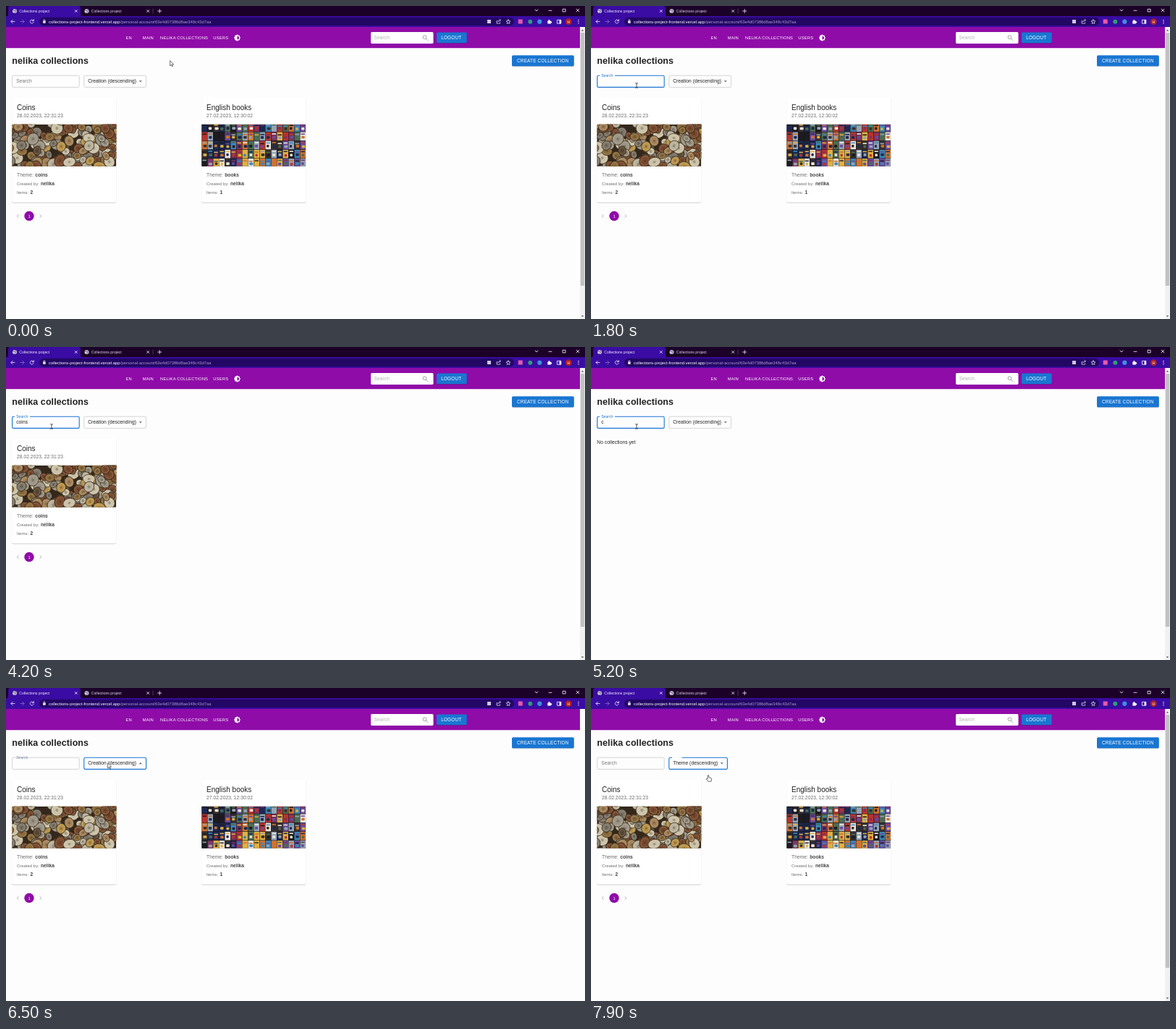
An HTML page that plays this animation: 800 px wide and 433 px high, repeating every 8000 ms.

```html
<!DOCTYPE html>
<html lang="en">
<head>
<meta charset="utf-8">
<title>Collections project</title>
<style>
  html, body { margin: 0; width: 100%; height: 100%; overflow: hidden; background: #fff; }
  svg { display: block; width: 800px; height: 433px; }
  text { font-family: "Liberation Sans", Arial, sans-serif; white-space: pre; }
  .line { fill: none; stroke-width: .8; stroke-linecap: round; stroke-linejoin: round; }
</style>
</head>
<body>
<svg id="stage" viewBox="0 0 800 433" xmlns="http://www.w3.org/2000/svg"></svg>
<script>
const LOOP = 8000;
const INK = '#212121', GREY = '#6b6b6b', BLUE = '#1976d2', PURPLE = '#8f0ca8';
const OWNER = 'nelika';

let seed = 7;
const rnd = () => (seed = (seed * 16807) % 2147483647) / 2147483647;
const pick = list => list[Math.floor(rnd() * list.length)];

// Markup helpers
const rect = (x, y, w, h, fill, more = '') =>
  `<rect x="${x}" y="${y}" width="${w}" height="${h}" fill="${fill}" ${more}/>`;
const dot = (x, y, r, fill, more = '') =>
  `<circle cx="${x}" cy="${y}" r="${r}" fill="${fill}" ${more}/>`;
const line = (d, color, more = '') => `<path class="line" d="${d}" stroke="${color}" ${more}/>`;
const text = (x, y, s, size, fill = INK, spacing = .06, more = '') =>
  `<text x="${x}" y="${y}" font-size="${size}" fill="${fill}" letter-spacing="${spacing}" ${more}>${s}</text>`;
const bold = 'font-weight="700"';
const group = (id, body, more = '') => `<g id="${id}" ${more}>${body}</g>`;
const cross = (x, y, r) =>
  line(`M${x - r} ${y - r}l${2 * r} ${2 * r}m0 ${-2 * r}l${-2 * r} ${2 * r}`, '#fff');

function tab(x, color) {
  return dot(x, 7, 3, '#d5cfe6') +
    line(`M${x - 2.6} 6h3l1 2l-2 1.6M${x + .5} 4.4l1.6 1.6`, '#4b4560') +
    text(x + 6.3, 9, 'Collections project', 5.15, color, 0) + cross(x + 84.8, 7, 1.5);
}

function browser() {
  const white = '#f2eefc';
  return rect(0, 0, 800, 15, '#1b0128') +
    `<path d="M0 14.5Q3 14.5 3 11V3Q3 0 6 0H100Q103 0 103 3V11Q103 14.5 106 14.5Z" fill="#3a0ca3"/>` +
    rect(0, 14, 800, 15, '#3a0ca3') +
    rect(46, 15.7, 656, 11.6, '#230764', 'rx="5.8"') +
    tab(12, white) + tab(111.5, '#e0d8ea') +
    line('M203 4v6', '#5a4668') + line('M209.7 7h5M212.2 4.5v5', white) +
    line('M731 5l2 2l2-2M750 6.3h4M769.5 4.3h3.6v3.6h-3.6z', '#fff') + cross(790, 6, 1.9) +
    line('M12 21.5H7M9.2 19.2L6.9 21.5l2.3 2.3', white) +
    line('M20 21.5h5M22.8 19.2l2.3 2.3l-2.3 2.3', '#8a74c4') +
    line('M38 20.3a2.5 2.5 0 1 0 .1 2.2M38.4 18.6v2h-2', white) +
    rect(51.2, 20.8, 3.4, 2.9, white, 'rx=".5"') + line('M51.9 20.8v-1a1 1 0 0 1 2 0v1', white) +
    text(59, 23.7, 'collections-project-frontend.vercel.app', 5.83, '#fff', 0) +
    text(158, 23.7, '/personal-account/63e4d07386d8ae348c43d7aa', 5.83, '#a99ccb', 0) +
    rect(665, 19, 5, 5, '#cfc7e4') +
    line('M679 20.5h-1v3.6h4.6v-1.4M679.6 22q.4-2.4 3.6-2.4M682 18.3l1.4 1.3l-1.4 1.4', '#d8d0ec') +
    line('M694 18.8l.9 1.9l2 .2l-1.5 1.4l.4 2.1l-1.8-1l-1.8 1l.4-2.1l-1.5-1.4l2-.2z', '#e8e2f6') +
    rect(707.7, 18.5, 6, 6, '#e65aa8') + dot(724.3, 21.7, 3, '#2f9d72') + dot(737.3, 21.7, 3.1, '#3d8fe0') +
    rect(748.3, 20.4, 4.6, 4.2, '#fff', 'rx=".4"') + dot(750.4, 20, 1.1, '#fff') + dot(753.2, 22.4, 1.1, '#fff') +
    line('M761.8 19.3h5v4.9h-5z', '#fff') + rect(764.6, 19.3, 2.2, 4.9, '#fff') +
    dot(777.3, 21.7, 4.4, '#b3201f') + text(775.4, 23.6, 'Н', 5.2, '#fff', 0) +
    [19.5, 21.7, 23.9].map(y => dot(791, y, .65, '#fff')).join('');
}

function header() {
  const nav = (x, s) => text(x, 46.1, s, 5.83, '#fff', .167);
  let rays = '';
  for (let a = 0; a < 360; a += 45)
    rays += rect(317.3, 41.8, 4.4, 4.4, '#fff', `transform="rotate(${a} 319.5 44) translate(1.1 1.1)"`);
  return rect(0, 29, 793, 29.2, PURPLE) +
    nav(165.5, 'EN') + nav(188.7, 'MAIN') + nav(213, OWNER.toUpperCase() + ' COLLECTIONS') + nav(286.3, 'USERS') +
    rays + dot(319.5, 44, 3.6, '#fff') + `<path d="M319.5 41.5a2.5 2.5 0 0 1 0 5z" fill="${PURPLE}"/>` +
    rect(504, 36, 86.5, 16, '#fff', 'rx="1.7"') + text(508.5, 46.2, 'Search', 6.67, '#b2b2b2') +
    line('M580.4 45.2l2.6 2.6', '#8c8c8c') + dot(578.5, 43.2, 2.4, 'none', 'stroke="#8c8c8c" stroke-width=".8"') +
    button(595, 36.4, 41.7, 14.8, 601.2, 46.2, 'LOGOUT');
}

function button(x, y, w, h, tx, ty, label) {
  return rect(x, y + .9, w, h, '#000', 'rx="1.7" opacity=".22"') +
    rect(x, y, w, h, BLUE, 'rx="1.7"') + text(tx, ty, label, 6.4, '#fff', .2);
}

function coins() {
  const metals = ['#9c9586', '#b9b19c', '#7d766a', '#8b6b3d', '#b8934c', '#77492e', '#cbc2a9', '#a4835a', '#5d4a35'];
  let out = rect(0, 0, 144, 58, '#33281b');
  for (let i = 0; i < 170; i++) {
    const x = (rnd() * 152 - 4).toFixed(1), y = (rnd() * 64 - 3).toFixed(1), r = 5 + rnd() * 4;
    const turn = `transform="translate(${x} ${y}) rotate(${Math.round(rnd() * 180)}) scale(1 ${(.72 + rnd() * .28).toFixed(2)})"`;
    out += `<g ${turn}>` + dot(0, 0, r.toFixed(1), pick(metals), 'stroke="#2c2116" stroke-width=".7"') +
      dot(0, 0, (r * .72).toFixed(1), 'none', 'stroke="#fff3d0" stroke-opacity=".25" stroke-width=".6"') +
      rect(-1.8, -2, 3.6, 4, '#3a2c1c', 'opacity=".3" rx="1.4"') + '</g>';
  }
  return out;
}

function books() {
  const covers = ['#1d2850', '#b5352f', '#dfb044', '#ece8de', '#3b86b5', '#1d1b20', '#7e3059',
    '#cf7230', '#4d6b52', '#6a4a9c', '#94a5b5', '#38302e'];
  let out = rect(0, 0, 144, 58, '#17141a');
  for (let row = 0; row < 5; row++)
    for (let col = 0; col < 18; col++) {
      const x = col * 8 + .3, y = row * 12.2 - 1.5;
      out += rect(x, y, 7.5, 11.6, pick(covers)) +
        rect(x + 1, y + 1.2 + rnd() * 2, 5.4, 1.6, pick(covers)) +
        rect(x + 1.3 + rnd(), y + 5 + rnd(), 3 + rnd() * 2, 3.6, pick(covers), 'rx=".8"');
    }
  return out;
}

function card(id, x, title, date, art, theme, count) {
  const tx = x + 6.8;
  return group(id,
    rect(x, 126.2, 144.2, 145.3, '#fff', 'rx="1.7" filter="url(#shade)"') +
    text(tx, 144, title, 10, INK, 0) + text(tx, 154.2, date, 6.67, GREY) +
    `<g transform="translate(${x} 163.8)" clip-path="url(#photo)">${art}</g>` +
    text(tx, 235.7, 'Theme:', 6.67, GREY) + text(x + 32, 235.7, theme, 6.67, '#444', .06, bold) +
    text(tx, 247.8, 'Created by:', 5.83, GREY) + text(x + 39.7, 247.8, OWNER, 6.67, '#444', .06, bold) +
    text(tx, 259.9, 'Items:', 5.83, GREY) + text(x + 25.2, 259.9, count, 6.67, '#444', .06, bold));
}

function page() {
  return text(8.3, 80.4, OWNER + ' collections', 12.5, INK, .09, bold) +
    button(699, 68.2, 85.8, 15, 706, 78, 'CREATE COLLECTION') +
    rect(8.6, 96.2, 92.6, 16.2, 'none', 'id="field" rx="1.7"') +
    rect(12, 95.2, 21, 2, '#fff', 'id="notch"') +
    text(0, 0, 'Search', 6.67, GREY, .06, 'id="label"') +
    text(14.2, 106.3, '', 6.67, INK, .06, 'id="typed"') +
    rect(14, 100.2, .7, 8, INK, 'id="caret"') +
    rect(107.8, 96.2, 85.8, 16.2, 'none', 'id="select" rx="1.7"') +
    rect(112, 95.2, 13.5, 2, '#fff', 'id="gap"') +
    text(113.2, 106.3, '', 6.67, INK, .06, 'id="choice"') +
    `<path id="arrow" d="M-2.1 -1H2.1L0 1.1Z" fill="#666"/>` +
    text(8.3, 134.2, 'No collections yet', 6.67, INK, .06, 'id="empty"') +
    card('first', 8.2, 'Coins', '28.02.2023, 22:31:23', coins(), 'coins', 2) +
    card('second', 270.2, 'English books', '27.02.2023, 12:30:02', books(), 'books', 1) +
    group('pager', line('M17.1 288.7l-1.9 1.9l1.9 1.9M47 288.7l1.9 1.9l-1.9 1.9', '#999') +
      dot(32, 290.5, 6.7, PURPLE) + text(30.4, 292.6, '1', 5.83, '#fff', 0));
}

const options = ['Theme (descending)', 'Theme (ascending)', 'Creation (descending)', 'Creation (ascending)'];

function menu() {
  return group('menu', rect(107.6, 112.8, 86, 66.8, '#fff', 'rx="1.7" filter="url(#lift)"') +
    rect(107.6, 146.2, 86, 15, '#e8f1fa') + rect(107.6, 116.2, 86, 15, '#f5f5f5', 'id="hover"') +
    options.map((s, i) => text(114.2, 126 + i * 15, s, 6.67)).join(''));
}

function scrollbar() {
  return group('bar', rect(793, 29, 7, 404, '#f1f1f1') + rect(793.8, 37, 5.4, 350, '#c1c1c1') +
    '<path d="M794.8 34.4h3.4l-1.7-2zM794.8 428.2h3.4l-1.7 2z" fill="#555"/>');
}

function pointers() {
  return group('arrowCur', '<path d="M0 0V7.2L1.7 5.7L2.8 8.2L3.9 7.7L2.8 5.3H5Z" fill="#fff" stroke="#111" stroke-width=".6"/>') +
    group('beamCur', line('M-1.4 -3.4Q0 -3.4 0 -2.6Q0 -3.4 1.4 -3.4M0 -2.6V2.6M-1.4 3.4Q0 3.4 0 2.6Q0 3.4 1.4 3.4', '#222')) +
    group('handCur', '<path d="M-.8 .6Q0 -.4 .8 .6V3.4L4 4.2Q4.8 4.6 4.6 5.6L4 8.8H-.2L-2.8 5.6Q-2.6 4.4 -.8 5.4Z" fill="#fff" stroke="#111" stroke-width=".6"/>');
}

document.getElementById('stage').innerHTML =
  `<defs><clipPath id="photo"><path d="M0 0H144.2V58H0Z"/></clipPath>
   <filter id="shade" x="-5%" y="-5%" width="110%" height="110%">
     <feDropShadow dx="0" dy=".7" stdDeviation=".7" flood-opacity=".32"/></filter>
   <filter id="lift" x="-15%" y="-15%" width="130%" height="140%">
     <feDropShadow dx="0" dy="2" stdDeviation="2.2" flood-opacity=".35"/></filter></defs>` +
  rect(0, 0, 800, 433, '#fefdfe') + browser() + header() + page() + scrollbar() + menu() + pointers();

// Timeline
const typing = [[0, ''], [2600, 'c'], [2900, 'co'], [3100, 'coin'], [3300, 'coins'],
  [4600, 'coin'], [4800, 'coi'], [5000, 'co'], [5200, 'c'], [5400, '']];
const lists = [[0, 'all'], [2800, 'none'], [3300, 'coins'], [4700, 'none'], [5500, 'all']];
const carets = [[0, 0], [1300, 1], [1800, 0], [2300, 1], [3800, 0], [4300, 1], [4900, 0], [5400, 1], [5900, 0]];
const shapes = [[0, 'arrowCur'], [560, 'beamCur'], [6320, 'arrowCur'], [7120, 'handCur']];
const path = [[0, 226.7, 75.6], [100, 226.7, 75.6], [720, 63, 110], [6200, 63, 110],
  [6440, 140.6, 103.8], [7000, 140.6, 103.8], [7300, 162, 120.4], [LOOP, 162, 120.4]];

const FOCUS = 1300, BLUR = 6480, CHOOSE = 7550;
const el = id => document.getElementById(id);
const set = (id, attrs) => { for (const k in attrs) el(id).setAttribute(k, attrs[k]); };
const show = (id, on) => set(id, { visibility: on ? 'visible' : 'hidden' });
const at = (steps, t) => steps.filter(s => s[0] <= t).pop()[1];
const clamp = v => Math.max(0, Math.min(1, v));
const ease = v => v * v * (3 - 2 * v);
const ramp = (t, start, time) => ease(clamp((t - start) / time));

function pointerAt(t) {
  const i = path.findIndex(p => p[0] > t), a = path[i - 1], b = path[i];
  const k = ramp(t, a[0], b[0] - a[0]);
  return [a[1] + (b[1] - a[1]) * k, a[2] + (b[2] - a[2]) * k];
}

function draw(t) {
  const typed = at(typing, t), list = at(lists, t);
  const focused = t >= FOCUS && t < BLUR, chosen = t >= CHOOSE;

  const up = ramp(t, FOCUS, 200) - ramp(t, BLUR, 200);
  set('label', {
    transform: `translate(14.2 ${106.3 - 8.6 * up}) scale(${1 - .25 * up})`,
    fill: focused ? BLUE : t >= BLUR && up > 0 ? '#6f87a6' : '#777'
  });
  const hover = t >= 560 && t < FOCUS;
  set('field', { stroke: focused ? BLUE : hover ? INK : '#c4c4c4', 'stroke-width': focused ? 1.1 : .7 });
  set('notch', { width: focused ? 21 * ramp(t, FOCUS, 100) : 0 });
  el('typed').textContent = typed;
  const width = typed ? el('typed').getComputedTextLength() : 0;
  set('caret', { x: 14.2 + width });
  show('caret', at(carets, t));

  const opened = t >= BLUR;
  set('select', {
    width: chosen ? 80.6 : 85.8, stroke: opened ? BLUE : '#c4c4c4', 'stroke-width': opened ? 1.1 : .7
  });
  show('gap', chosen);
  el('choice').textContent = chosen ? options[0] : options[2];
  set('arrow', {
    transform: `translate(${chosen ? 180.8 : 185.8} 104.2) scale(1 ${opened && !chosen ? -1 : 1})`
  });

  show('first', list !== 'none');
  show('second', list === 'all');
  show('pager', list !== 'none');
  show('empty', list === 'none');

  const fade = ramp(t, 6520, 230) - ramp(t, CHOOSE, 230);
  set('menu', {
    opacity: fade,
    transform: `translate(0 112.8) scale(1 ${chosen ? 1 : .6 + .4 * fade}) translate(0 -112.8)`
  });
  show('hover', t > 7180);
  show('bar', t < BLUR || t > CHOOSE + 230);

  const [x, y] = pointerAt(t), shape = at(shapes, t);
  for (const [, id] of shapes.slice(0, 2).concat(shapes.slice(3))) {
    show(id, id === shape);
    set(id, { transform: `translate(${x} ${y})` });
  }
}

function tick() {
  draw(performance.now() % LOOP);
  requestAnimationFrame(tick);
}
tick();
</script>
</body>
</html>
```
